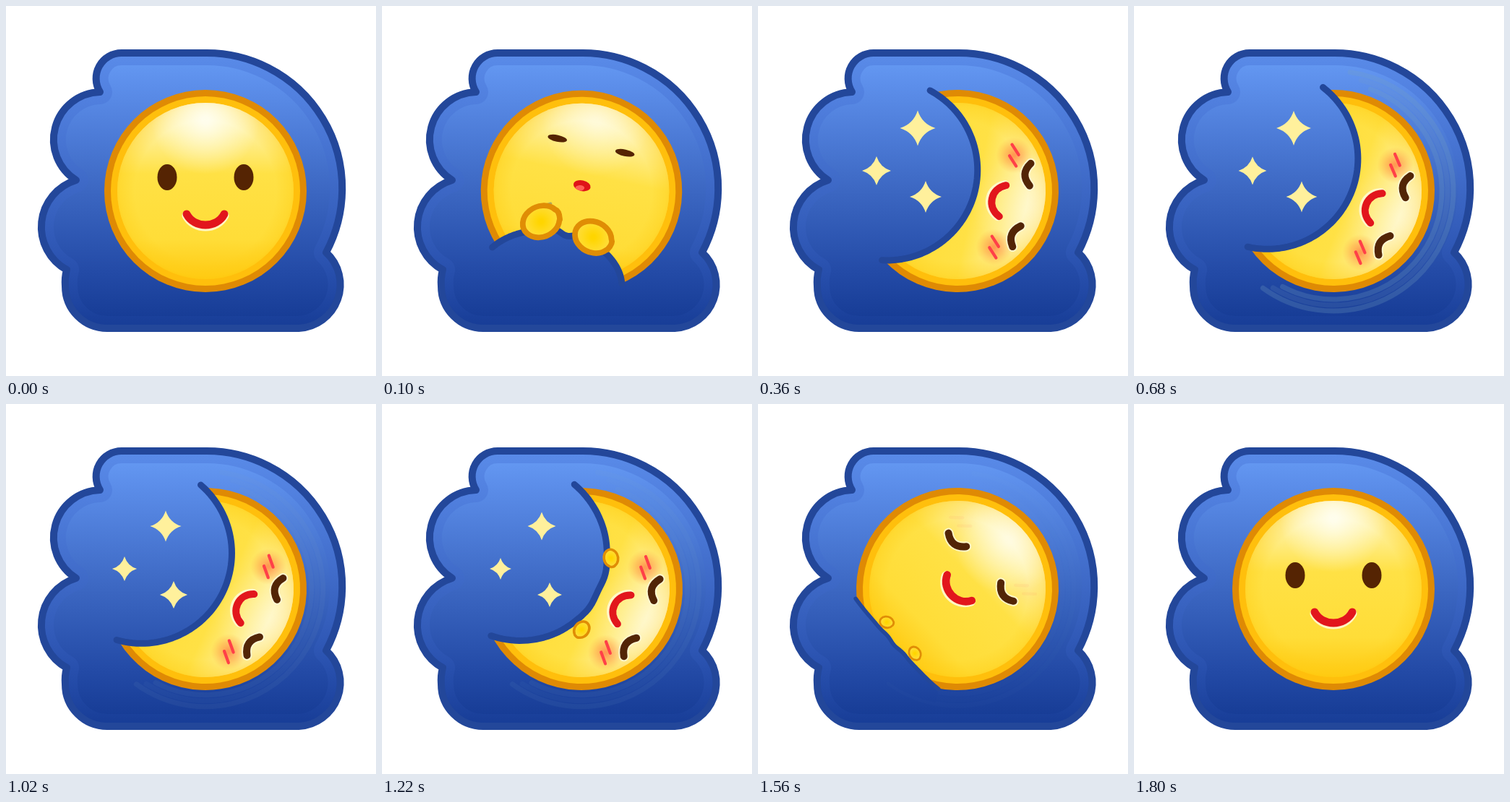
Animation of 512x512 px, one loop 1820 ms. Source, as an HTML page with a canvas:

```html
<!DOCTYPE html>
<html>
<head>
<meta charset="utf-8">
<title>Sleepy moon</title>
<style>
html, body { margin: 0; width: 100%; height: 100%; overflow: hidden; background: #fff; }
canvas { display: block; width: 100vmin; height: 100vmin; }
</style>
</head>
<body>
<canvas id="stage" width="512" height="512"></canvas>
<script>
const c = document.getElementById('stage').getContext('2d');
const LOOP = 1820, STEP = 20, TAU = Math.PI * 2, RAD = Math.PI / 180;
const MX = 276, MY = 256, EDGE = '#23479a';

const mix = (a, b, p) => a + (b - a) * p;
const part = (t, a, b) => Math.min(1, Math.max(0, (t - a) / (b - a)));
const ease = (t, a, b) => { const p = part(t, a, b); return p * p * (3 - 2 * p); };
// Rises from a to b, falls from y to z
const pulse = (t, a, b, y, z) => ease(t, a, b) * (1 - ease(t, y, z));

function poseAt(t) {
  const settle = 1 - (1 - part(t, 360, 1020)) ** 2;
  const wake = pulse(t, 1160, 1380, 1440, 1600);
  return {
    turn: (29 * ease(t, 20, 200) + 74 * ease(t, 190, 370) + 12 * settle) * (1 - ease(t, 1430, 1660)),
    tuck: pulse(t, 20, 170, 1440, 1640),
    up: 9 * (pulse(t, 20, 180, 220, 360) + wake),
    sway: 4 * wake,
    open: 1 - pulse(t, 40, 130, 1540, 1660),
    yawn: pulse(t, 60, 180, 230, 320),
    cover: pulse(t, 20, 180, 1410, 1610),
    hold: 1 - ease(t, 210, 340) + .3 * ease(t, 1140, 1300) + .7 * ease(t, 1400, 1600),
    hands: pulse(t, 20, 110, 220, 320) + pulse(t, 1160, 1290, 1500, 1600),
    blush: pulse(t, 250, 350, 1440, 1580),
    stars: pulse(t, 240, 345, 1420, 1540),
    shrink: 7.5 * part(t, 400, 1400) ** 2,
    glow: .65 * pulse(t, 370, 660, 680, 1040) + .35 * pulse(t, 370, 660, 1400, 1620)
  };
}

const cloud = new Path2D('M160 65H276A187.5 187.5 0 0 1 443 341A60.5 60.5 0 0 1 405 446' +
  'H140A58 58 0 0 1 82 388Q81 376 84 365A67.6 67.6 0 0 1 97 241A66 66 0 0 1 130 119' +
  'A35.3 35.3 0 0 1 160 65Z');

function ramp(g, ...stops) {
  stops.forEach(([p, col]) => g.addColorStop(p, col));
  return g;
}
const down = (y0, y1, ...stops) => ramp(c.createLinearGradient(0, y0, 0, y1), ...stops);
const round = (r0, r1, ...stops) => ramp(c.createRadialGradient(0, 0, r0, 0, 0, r1), ...stops);

const sky = down(65, 446,
  [0, '#679cf5'], [.12, '#5c8eea'], [.5, '#3c67c2'], [.8, '#234aa6'], [1, '#143992']);
const hem = down(65, 446, [0, 'rgba(62,104,206,.32)'], [.7, 'rgba(62,104,206,.2)'], [1, 'rgba(62,104,206,.06)']);
const body = down(-128, 132,
  [0, '#fffdf0'], [.07, '#fff8cf'], [.22, '#ffed8a'], [.4, '#ffe145'], [.75, '#ffdd38'], [1, '#ffc60a']);
const rim = round(98, 131,
  [0, 'rgba(255,205,20,0)'], [.6, 'rgba(255,205,20,.35)'], [1, 'rgba(255,190,0,.6)']);
const shine = round(5, 75, [0, 'rgba(255,255,245,.85)'], [1, 'rgba(255,255,230,0)']);
const palm = round(3, 30, [0, '#ffd500'], [1, '#ffe04a']);
const flush = round(2, 25,
  [0, 'rgba(255,100,50,.6)'], [.5, 'rgba(255,130,50,.35)'], [1, 'rgba(255,160,50,0)']);

function at(x, y, rot, draw) {
  c.save();
  c.translate(x, y);
  c.rotate(rot * RAD);
  draw();
  c.restore();
}
function disc(x, y, rx, ry, fill, rot = 0) {
  c.beginPath();
  c.ellipse(x, y, rx, ry, rot, 0, TAU);
  c.fillStyle = fill;
  c.fill();
}
function line(col, w, build) {
  c.beginPath();
  build();
  c.strokeStyle = col;
  c.lineWidth = w;
  c.stroke();
}
function bow(x0, y0, cx, cy, x1, y1) {
  c.moveTo(x0, y0);
  c.quadraticCurveTo(cx, cy, x1, y1);
}

function drawCloud() {
  c.fillStyle = sky;
  c.fill(cloud);
  c.save();
  c.clip(cloud);
  c.strokeStyle = hem;
  c.lineWidth = 34;
  c.stroke(cloud);
  c.restore();
  c.strokeStyle = EDGE;
  c.lineWidth = 10;
  c.stroke(cloud);
}

function drawGlow(a) {
  if (a <= 0) return;
  for (let i = 0; i < 3; i++) {
    const r = 145 + 8 * i + 5 * a, alpha = (i === 1 ? .16 : .25) * a;
    line(`rgba(118,158,190,${alpha})`, 7, () => c.arc(MX, MY, r, (-70 - 6 * i) * RAD, (118 + 4 * i) * RAD));
  }
}

function drawMoon(s) {
  disc(0, 0, 140, 140, '#df8a04');
  disc(0, 0, 131, 131, '#ffbf0c');
  disc(0, 0, 122, 122, body);
  disc(0, 0, 122, 122, rim);
  c.save();
  c.beginPath();
  c.arc(0, 0, 122, 0, TAU);
  c.clip();
  c.globalAlpha = 1 - .7 * s.tuck;
  at(0, -98, 0, () => disc(0, 0, 90, 75, shine));
  c.restore();
}

function drawEyes(s) {
  const y = mix(-19, -93, s.tuck) - s.up, x = mix(53, 43.5, s.tuck);
  for (const side of [-1, 1]) {
    if (s.open > .2) {
      disc(side * x, y, 13.5, 18 * s.open, '#552403');
      continue;
    }
    const tilt = 1 - s.yawn;
    const lid = () => bow(side * (x + 15.5), y + 2 * tilt, side * (x - 2 * tilt), y + mix(10, 14, tilt),
      side * (x - 15), y - 3 * tilt);
    const w = mix(10, 7, s.yawn);
    line('rgba(255,250,215,.85)', w + 4, lid);
    line(s.yawn > .5 ? '#74450f' : '#522506', w, lid);
  }
}

function drawMouth(s) {
  const y = mix(32, -64, s.tuck) - s.up;
  if (s.yawn > .12) {
    const r = 28.5 * s.yawn;
    c.save();
    disc(-3 * s.yawn, y + 18, Math.max(r, 12), r, '#df1418');
    c.clip();
    disc(-3, y + 18 + r * .5, r * .86, r * .52, '#ff5f55', -.25);
    c.restore();
    return;
  }
  const w = mix(26, 22, s.tuck);
  const smile = () => {
    c.moveTo(-w, y);
    c.bezierCurveTo(-w * .6, y + 20, w * .6, y + 20, w, y);
  };
  at(0, 2, 0, () => line('rgba(255,250,210,.9)', 13, smile));
  line('#e2161c', mix(11, 10, s.tuck), smile);
}

function drawBlush(s) {
  if (s.blush <= 0) return;
  c.globalAlpha = s.blush;
  for (const side of [-1, 1]) at(side * 65, -66 - s.up, 0, () => {
    disc(0, 0, 25, 25, flush);
    for (const dx of [-8, 8]) line('#ff4048', 4.2, () => {
      c.moveTo(dx - 6, 6);
      c.lineTo(dx + 6, -6);
    });
  });
  c.globalAlpha = 1;
}

// Top hem of the blanket at u = 0..1: a wide arc, pulled out of round by the hands,
// sinking into the lower rim of the moon when uncovered
function hemPoint(u, s) {
  const a = mix(-164, -9, u) * RAD, low = mix(125, 55, u) * RAD;
  const crease = 8 * Math.cos(TAU * (u - .48) / .19) * Math.exp(-(((u - .48) / .13) ** 2));
  const x = -7.6 + 125 * Math.cos(a) - s.hold * 34 * u ** 3;
  const y = 101.2 + 125 * Math.sin(a) + s.hold * (30 * u ** 3 + 22 * (1 - u) ** 4 + crease);
  return [mix(141 * Math.cos(low), x, s.cover), mix(141 * Math.sin(low), y, s.cover)];
}

function drawBlanket(s) {
  if (s.cover <= .01) return;
  const pts = Array.from({ length: 61 }, (_, i) => hemPoint(i / 60, s));
  const trace = () => pts.forEach((p, i) => i ? c.lineTo(...p) : c.moveTo(...p));
  const l = pts[0], r = pts[60];
  // The fill uses the sky gradient in stage space
  c.save();
  c.beginPath();
  c.arc(0, 0, 160, 0, TAU);
  c.clip();
  c.beginPath();
  trace();
  c.lineTo(r[0] * 1.3, r[1] * 1.3);
  c.lineTo(r[0], 240);
  c.lineTo(l[0], 240);
  c.lineTo(l[0] * 1.3, l[1] * 1.3);
  c.setTransform(1, 0, 0, 1, 0, 0);
  c.fillStyle = sky;
  c.fill();
  c.restore();
  line(EDGE, 9 * Math.min(1, s.cover * 4), trace);
  const fold = s.hold * s.hands * s.cover;
  if (fold > .4) {
    const col = `rgba(32,68,152,${.75 * fold})`;
    line(col, 4, () => bow(-65, 56, -58, 36, -38, 26));
    line(col, 4, () => bow(-54, 70, -46, 66, -39, 57));
  }
}

function drawHand(x, y, rot, s) {
  if (s.hands <= .03) return;
  const rx = 30, ry = 25;
  at(mix(x * .5, x, s.cover), mix(125, y, s.cover), rot, () => {
    c.scale(s.hands, s.hands);
    disc(0, 0, rx, ry, palm);
    line('#e08d05', 8, () => {
      c.ellipse(0, 0, rx - 3, ry - 3, 0, 24 * RAD, 338 * RAD);
      c.quadraticCurveTo(rx, -ry * .15, rx - 4, ry * .3);
    });
  });
}

function drawStars(s) {
  c.fillStyle = '#fff09c';
  for (const [x, y, size] of [[221, 169, 24.5], [164, 228, 20], [232, 264, 22]]) {
    const r = Math.max(0, size - s.shrink) * s.stars;
    c.beginPath();
    c.moveTo(x + r, y);
    for (let i = 0; i < 4; i++) {
      const a = (i + .5) * TAU / 4, b = (i + 1) * TAU / 4, q = r * .34;
      c.quadraticCurveTo(x + q * Math.cos(a), y + q * Math.sin(a), x + r * Math.cos(b), y + r * Math.sin(b));
    }
    c.fill();
  }
}

function draw(t) {
  const s = poseAt(t);
  c.clearRect(0, 0, 512, 512);
  c.lineCap = c.lineJoin = 'round';
  drawCloud();
  drawGlow(s.glow);
  at(MX, MY, s.turn, () => {
    const k = 1 - .02 * s.yawn;
    c.save();
    c.scale(k, k);
    drawMoon(s);
    c.restore();
    c.translate(s.sway, 0);
    drawBlush(s);
    drawEyes(s);
    drawMouth(s);
    drawBlanket(s);
    drawHand(-56 - 5 * s.hold, -19, -35, s);
    drawHand(52 - 13 * s.hold, -27 + 20 * s.hold, 13, s);
  });
  drawStars(s);
}

const start = performance.now();
function tick() {
  const t = (performance.now() - start) % LOOP;
  draw(Math.floor(t / STEP) * STEP);
  requestAnimationFrame(tick);
}
tick();
</script>
</body>
</html>
```
